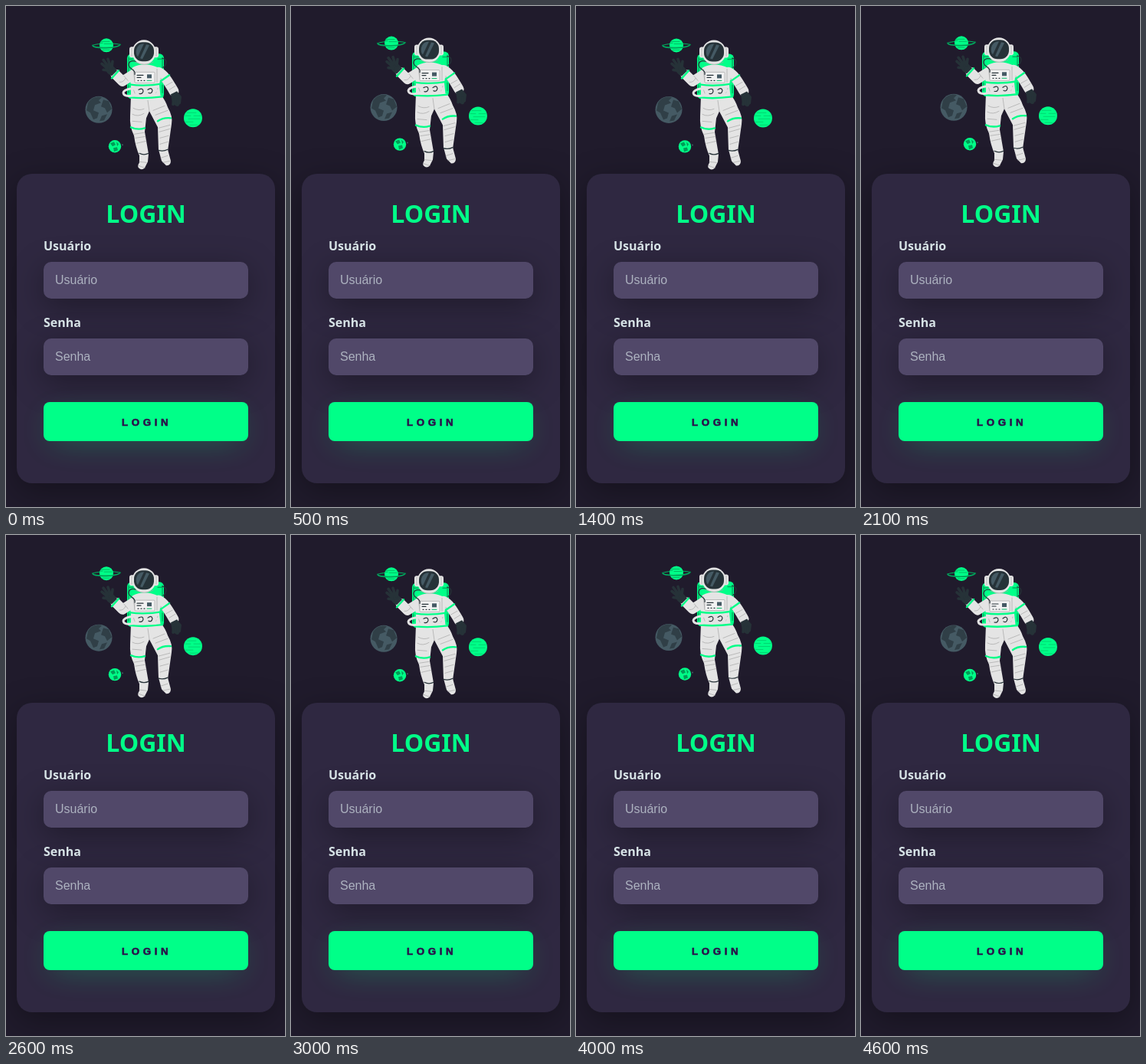
Write an HTML page that moves like this. It is 364x654 px and loops after 4700 ms.

```html
<!DOCTYPE html>
<html lang="pt">
<head>
<meta charset="utf-8">
<title>Login</title>
<style>
html, body { margin: 0; width: 100%; height: 100%; overflow: hidden; background: #201b2c; }
div, svg { position: absolute; }
svg { left: 0; top: 0; }
.card { left: 14px; top: 219px; width: 337px; height: 404px; border-radius: 20px; background: #2f2841; box-shadow: 0 10px 40px #00000056; }
.field, .button { left: 49px; width: 267px; border-radius: 10px; }
.field { height: 48px; background: #514869; box-shadow: 0 10px 40px #00000056; }
.button { top: 517px; height: 51px; border-radius: 8px; background: #00ff88; box-shadow: 0 10px 40px -12px #00ff8052; }
.title { font: bold 32px "Noto Sans", sans-serif; fill: #00ff88; text-anchor: middle; }
.label { font: bold 16px "Noto Sans", sans-serif; fill: #f0ffffde; }
.hint { font: 16px "Liberation Sans", Arial, sans-serif; fill: #f0ffff94; }
.action { font: bold 13.33px "Liberation Sans", Arial, sans-serif; letter-spacing: 4.6px; fill: #2b134b; stroke: #2b134b; stroke-width: .6px; }
#scene path { stroke-linecap: round; stroke-linejoin: round; }
.white { fill: #e4e4e4; }
.dark { fill: #263238; }
.green { fill: #00ff88; }
.fold, .line, .band, .limb, .glove, .hose, .stripe { fill: none; }
.fold { stroke: #a6a6a6; stroke-width: .7; }
.line { stroke: #263238; stroke-width: 1.2; }
.band { stroke: #00ff88; stroke-width: 2.4; }
.limb { stroke: #e4e4e4; stroke-width: 13; }
.glove { stroke: #263238; stroke-width: 3.6; }
.hose { stroke: #e4e4e4; stroke-width: 3; }
.stripe { stroke: #00b963; stroke-width: 1; }
</style>
</head>
<body>
<div class="card"></div>
<div class="field" style="top:334px"></div>
<div class="field" style="top:434px"></div>
<div class="button"></div>
<svg width="364" height="654" viewBox="0 0 364 654">
  <g id="scene">
    <!-- planets -->
    <path class="stripe" d="M113 51C119 48 143 48 149 50"/>
    <circle class="green" cx="131" cy="51" r="9"/>
    <path class="stripe" d="M124 46h11M128 49h10M123 48h3M126 57h9"/>
    <path d="M113 51C115 56 146 55 149 50" fill="none" stroke="#008f51" stroke-width="1.7"/>
    <path d="M113 52C117 55 146 54 148 51" fill="none" stroke="#00d875" stroke-width=".6"/>
    <circle cx="121" cy="135" r="17.5" fill="#455a64"/>
    <path d="M107 126C112 118 121 117 125 119L121 123L124 126L116 129L114 136L121 139L119 146L114 148L110 139L105 136ZM127 122L134 124L138 134L132 139L129 133L124 131ZM125 143L132 141L128 149L122 150Z" fill="#303f47"/>
    <circle class="green" cx="244" cy="146" r="12"/>
    <path class="stripe" d="M236 139h12M234 143h7M245 143h9M238 147h15M234 151h10M240 155h10" opacity=".6"/>
    <circle class="green" cx="142" cy="183" r="8.2"/>
    <path d="M136 179l5 -2 2 4 -4 2zM144 177l3 3 -2 3zM140 185l5 -1 1 4 -5 2zM135 185l3 2" fill="#009c57"/>
    <circle cx="152" cy="181" r="1" fill="#455a64"/>

    <!-- backpack -->
    <rect class="green" x="158" y="62" width="48" height="59" rx="6"/>
    <path d="M160 67v46M204 67v46M161 69h5M198 69h6" fill="none" stroke="#00ad60" stroke-width="1.5"/>
    <path class="line" d="M204 68C211 69 210 76 205 80"/>

    <!-- arms -->
    <path class="limb" d="M143 89L152 98L168 88" stroke-width="12"/>
    <path class="limb" d="M199 86C207 89 213 101 219 111"/>
    <path class="fold" d="M148 99Q153 100 156 94M159 97L154 91M208 104L217 99M213 109L221 104M202 94L204 101"/>
    <path class="band" d="M138 94L147 84M203 97L213 90"/>
    <path class="dark" d="M129 79Q133 74 139 77L145 84L138 91Q130 88 129 79Z"/>
    <path class="glove" d="M132 81L125 75M133 78L127 70M136 78L133 69M138 80L139 72M134 84L127 83"/>
    <path class="dark" d="M215 115L223 111L229 118L228 127L223 131L217 127Z"/>
    <path class="glove" d="M219 122L218 128M224 122L224 129"/>

    <!-- legs -->
    <path class="white" d="M163 117H203Q208 123 211 132Q218 144 216 154L211 189L199 188L198 158L187 137L183 146L181 164L186 193L174 195Q169 184 167 169Q161 157 162 143Z"/>
    <path class="fold" d="M166 133Q173 137 180 134M165 141Q172 145 180 140M187 137L185 123M192 136L207 130M195 142L211 136M167 167L180 165M169 172L182 170M170 179L183 176M199 159L214 155M200 164L214 160M201 172L212 169M201 180L211 177M165 150L177 151"/>
    <path class="band" d="M163 158Q172 162 181 159M198 150Q205 145 215 146"/>
    <path class="white" d="M174 193L186 193L185 203L181 211Q177 215 173 211Q171 209 174 204ZM199 187L211 187L215 202Q215 208 209 208L203 202Z"/>
    <path class="line" d="M174 192Q180 195 186 192M199 188Q205 190 211 187" stroke-width="2"/>
    <path class="fold" d="M174 203L183 204M173 208L181 211M202 198L211 195M205 204L214 202"/>

    <!-- torso -->
    <path class="white" d="M165 80Q180 72 198 80Q203 89 200 103L202 122H163L163 103Q160 90 165 80Z"/>
    <path class="band" d="M161 102Q181 105 204 101M162 119Q181 121 204 118"/>
    <path class="fold" d="M166 82L168 98M197 82L197 99M166 108L169 116M198 107L195 116"/>
    <rect x="168" y="86" width="26" height="14" rx="1" fill="#f2f2f2" stroke="#a6a6a6" stroke-width=".7"/>
    <path class="line" d="M171 90h8M171 93h5M172 97h1M176 97h1M180 97h1"/>
    <rect x="184" y="89" width="6" height="5" fill="#455a64"/>
    <path class="stripe" d="M184 97h6"/>
    <path class="hose" d="M174 111C167 104 153 109 153 113C154 120 171 117 175 111M187 111C194 105 203 112 195 116"/>
    <path class="line" d="M173 109Q179 106 179 111Q178 115 174 114M185 109Q190 105 191 110Q190 115 186 113"/>
    <path class="line" d="M170 72C160 69 157 77 164 82Q169 85 168 89" stroke-width="2"/>

    <!-- helmet -->
    <rect class="white" x="161" y="53" width="7" height="14" rx="3"/>
    <rect class="white" x="192" y="53" width="7" height="14" rx="3"/>
    <path class="fold" d="M164 55v10M196 55v10"/>
    <ellipse class="white" cx="180" cy="60" rx="15.5" ry="16"/>
    <rect class="dark" x="167" y="47" width="26" height="25" rx="11"/>
    <path d="M170 57Q172 49 180 49L172 66Q169 63 170 57ZM183 50L187 51L178 69L175 68Z" fill="#455a64"/>
    <path class="fold" d="M169 73Q180 79 192 73"/>
  </g>
  <text class="title" x="182.5" y="283">LOGIN</text>
  <text class="label" x="49" y="319">Usuário</text>
  <text class="label" x="49" y="419">Senha</text>
  <text class="hint" x="64" y="363">Usuário</text>
  <text class="hint" x="64" y="463">Senha</text>
  <text class="action" x="151" y="548">LOGIN</text>
</svg>
<script>
const LOOP = 4700, STEP = 100, PERIOD = 1500;
const scene = document.getElementById("scene");

function draw(now) {
  const t = Math.floor(now % LOOP / STEP) * STEP;
  const y = 1.6 * Math.cos(2 * Math.PI * (t / PERIOD + 0.05)) - 1.2;
  scene.setAttribute("transform", `translate(0 ${y.toFixed(2)})`);
  requestAnimationFrame(draw);
}
draw(performance.now());
</script>
</body>
</html>
```
